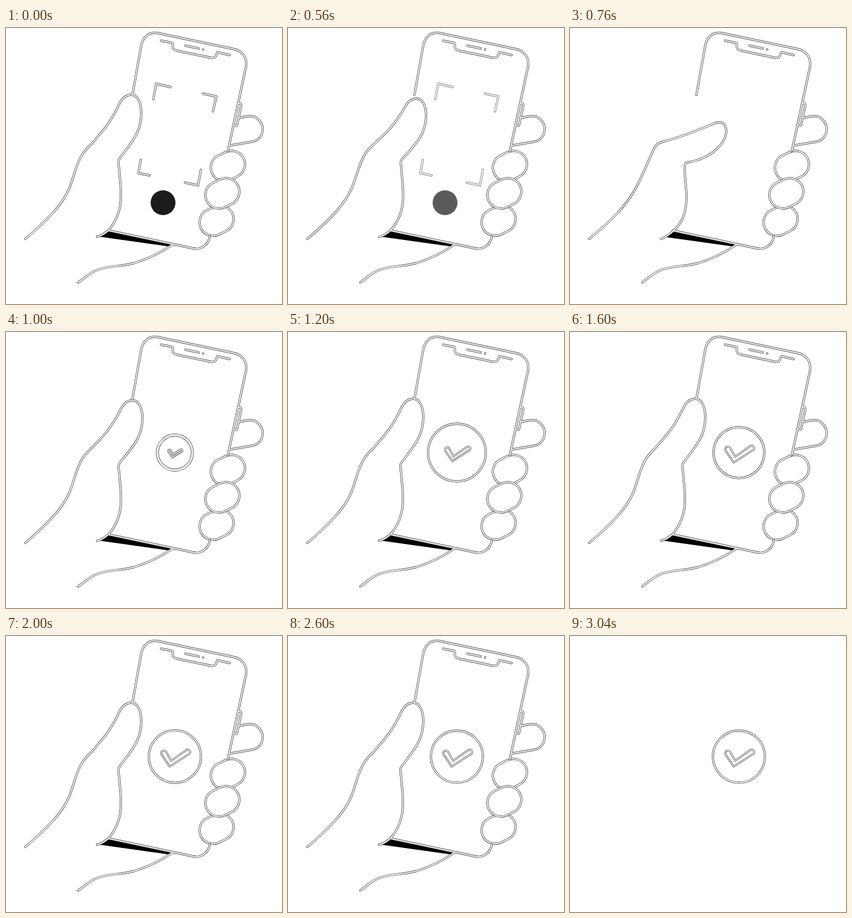
Animation of 500x500 px, one loop 3080 ms. Source, as an HTML page:

```html
<!DOCTYPE html>
<html lang="en">
<head>
<meta charset="utf-8">
<title>Scan and confirm</title>
<style>
  html, body { margin: 0; width: 100%; height: 100%; overflow: hidden; background: #fff; }
  svg { display: block; width: 100%; height: 100%; }
  .ink { --w: 3.9; fill: none; stroke-linecap: round; stroke-linejoin: round; }
  .dark { stroke: #2b2b2b; stroke-width: calc(var(--w) * 1px); }
  .light { stroke: #e8e8e6; stroke-width: calc((var(--w) - 1.3) * 1px); }
  .solid { fill: #fff; }
  #tick { vector-effect: non-scaling-stroke; }
</style>
</head>
<body>
<svg viewBox="0 0 500 500">
  <defs>
    <rect id="finger" x="-31.5" y="-24.5" width="63" height="49" rx="24.5"/>
    <g id="outerFingers">
      <use href="#finger" transform="translate(402 250) rotate(-25)"/>
      <use href="#finger" transform="translate(381.5 349) rotate(-25)"/>
    </g>
    <use id="middleFinger" href="#finger" transform="translate(392 299.5) rotate(-25)"/>
    <g id="lines">
      <path d="M229 121L245 32C248 16 259 7 274 9L412 38C428 41 437 53 435 69L402 223"/>
      <path d="M421 137C424 135 427 137 426 141L419 174C418 178 415 178 414 176"/>
      <path d="M281 23L301 27C304 28 301 34 303 37C304 39 306 40 309 41L372 54C380 55 380 51 382 46C383 43 385 44 387 45L405 49"/>
      <path d="M325 32L349 37M357 39h.5"/>
      <path d="M421 163L437 160C453 157 465 170 465 183C465 195 457 204 446 206L405 213"/>
      <path d="M186 367L338 399C353 403 368 392 369 377"/>
      <path d="M302 392C280 407 253 420 232 426C205 433 190 430 166 438C152 443 142 453 131 461"/>
      <path id="thumb"/>
    </g>
    <path id="corners" d="M267 129L272 101L298 107M357 119L381 124L375 151M244 239L240 263L260 267M324 280L348 285L353 257"/>
    <circle id="circle" cx="306" cy="218.5"/>
    <path id="tick" d="M281.5 214A4.9 4.9 0 0 1 290 209.5L299 226L327 206.5A4.6 4.6 0 0 1 333 213L296.5 236.5Z"/>
  </defs>

  <g id="hand" class="ink">
    <path id="shadow" fill="#000"/>
    <use href="#outerFingers" class="dark solid"/>
    <use href="#outerFingers" class="light"/>
    <use href="#middleFinger" class="dark solid"/>
    <use href="#middleFinger" class="light"/>
    <use href="#lines" class="dark"/>
    <use href="#lines" class="light"/>
  </g>
  <g id="scanner" class="ink">
    <use href="#corners" class="dark"/>
    <use href="#corners" class="light"/>
    <circle cx="284.5" cy="316.5" r="22.5" fill="#1b1c1d"/>
  </g>
  <g id="ring" class="ink">
    <use href="#circle" class="dark"/>
    <use href="#circle" class="light"/>
  </g>
  <g id="mark" class="ink" style="--w:3.2">
    <use href="#tick" class="dark"/>
    <use href="#tick" class="light"/>
  </g>
</svg>
<script>
const LOOP = 3080, STEP = 40;
const el = id => document.getElementById(id);
const [hand, thumb, shadow, scanner, ring, circle, mark] =
  ['hand', 'thumb', 'shadow', 'scanner', 'ring', 'circle', 'mark'].map(el);

const thumbUp = 'M35 382C70 352 102 322 115 290C124 266 127 247 137 231C141 224 146 219 152 213' +
  'C172 190 187 177 206 136C212 125 219 121 227 121C238 121 245 135 245 154C245 190 228 206 206 236' +
  'C202 241 204 246 205 256C207 282 209 291 208 310C207 335 197 353 186 366C180 372 173 376 165 378';
const thumbTap = 'M35 382C70 353 102 324 122 285C135 259 143 238 152 219C156 211 160 208 168 206' +
  'C200 198 228 187 258 174C264 171 268 171 271 171C279 171 283 178 283 188C282 208 258 235 216 243' +
  'C207 244 208 247 208 254C208 278 211 290 211 306C211 335 203 353 188 367C181 373 174 379 165 382';
const shadowUp = 'M185 367L302 392L297 396L169 378Z';
const shadowTap = 'M188 368L302 392L297 396L175 379Z';

const progress = (t, from, to) => Math.min(1, Math.max(0, (t - from) / (to - from)));
const smooth = p => p * p * (3 - 2 * p);

// Eased value through [time, value] keys
function track(t, keys) {
  let value = keys[0][1];
  for (let i = 1; i < keys.length; i++) {
    const [t0, v0] = keys[i - 1], [t1, v1] = keys[i];
    if (t >= t0) value = v0 + (v1 - v0) * smooth(progress(t, t0, t1));
  }
  return value;
}

function mix(a, b, p) {
  const target = b.match(/\d+/g);
  let i = 0;
  return a.replace(/\d+/g, n => (+n + (target[i++] - n) * p).toFixed(2));
}

const tapKeys = [[500, 0], [760, 1], [1040, 0]];
const radiusKeys = [[760, 0], [1180, 52.3], [1560, 46], [1960, 47.3], [2360, 47]];

function show(node, visible) {
  node.style.display = visible ? '' : 'none';
}

function draw(t) {
  const tap = track(t, tapKeys);
  thumb.setAttribute('d', mix(thumbUp, thumbTap, tap));
  shadow.setAttribute('d', mix(shadowUp, shadowTap, tap));
  show(hand, t < LOOP - STEP);

  scanner.style.opacity = 1 - progress(t, 500, 720);

  const radius = track(t, radiusKeys);
  show(ring, radius > 0);
  circle.setAttribute('r', radius);
  ring.style.setProperty('--w', 3.8 + Math.max(0, 52 - radius) * (1 - progress(t, 1000, 1180)) * .08);

  const rest = 1 - progress(t, 840, 1400);
  const scale = 1 - rest * rest;
  show(mark, scale > 0);
  mark.setAttribute('transform', `translate(306 218.5) scale(${scale}) translate(-306 -218.5)`);
}

const start = performance.now();
function tick(now) {
  const t = Math.max(0, now - start) % LOOP;
  draw(Math.floor(t / STEP) * STEP);
  requestAnimationFrame(tick);
}
draw(0);
requestAnimationFrame(tick);
</script>
</body>
</html>
```
